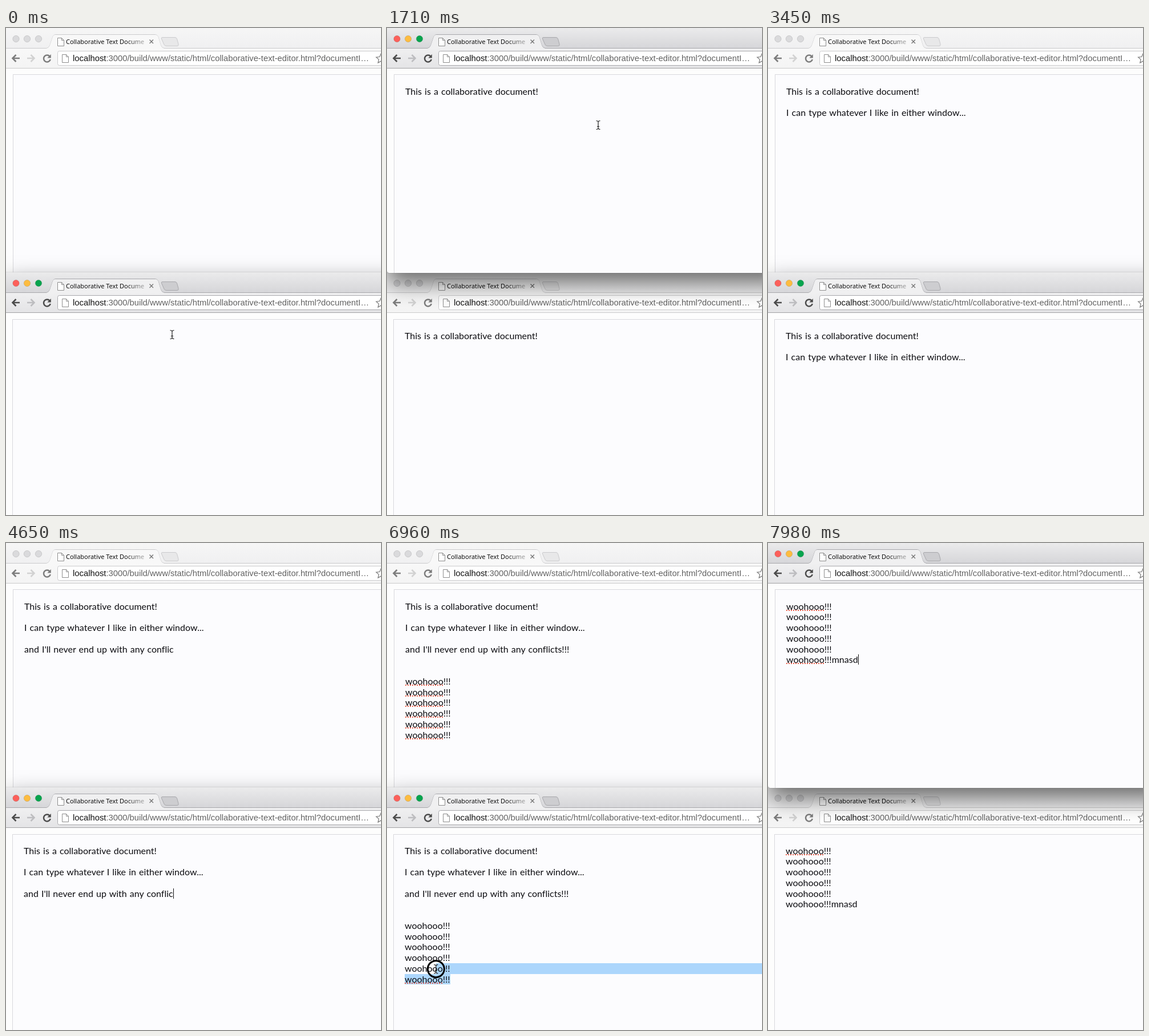
Animation of 657x853 px, one loop 8 s. Source, as an HTML page:

```html
<!DOCTYPE html>
<html lang="en">
<head>
<meta charset="utf-8">
<title>Collaborative text</title>
<style>
html, body { margin: 0; width: 100%; height: 100%; overflow: hidden; }
#stage { position: relative; width: 657px; height: 853px; overflow: hidden; background: #f4f4f5; }
.window {
  position: absolute; left: 0; width: 700px; height: 429px; z-index: 1;
  background: #fdfdfd; border-radius: 0 0 0 4px;
  --top: #f6f6f6; --low: #f0f0f1; --tab: #f8f8f8; --bar: #f4f4f4; --edge: #cbcbcd;
  --line: #cacacb; --icon: #7d7d7d; --dim: #d2d2d2; --plus: #e8e8e9;
  --red: #dadadc; --amber: #dadadc; --green: #dadadc;
}
.window.active {
  z-index: 2; box-shadow: 0 18px 40px rgba(0, 0, 0, .58), 0 0 1px rgba(0, 0, 0, .6);
  --top: #ebebec; --low: #d6d6d9; --tab: #f0f0f1; --bar: #e4e4e6; --edge: #a8a8ac;
  --line: #a2a2a4; --icon: #4c4c4c; --dim: #bdbdc0; --plus: #cdcdd0;
  --red: #fc605b; --amber: #fdbc40; --green: #07a44e;
}
.strip { position: absolute; inset: 0 0 auto; height: 35px; background: linear-gradient(var(--top), var(--low)); }
.bar { position: absolute; inset: 35px 0 auto; height: 35px; background: linear-gradient(var(--tab), var(--bar)); border-bottom: 1px solid var(--line); }
.window svg { position: absolute; left: 0; top: 0; }
.title {
  position: absolute; left: 105px; top: 15px; width: 140px; overflow: hidden;
  font: 11px/17px "Open Sans", sans-serif; color: #000; white-space: pre;
  -webkit-mask-image: linear-gradient(90deg, #000 105px, rgba(0, 0, 0, .25) 140px);
  mask-image: linear-gradient(90deg, #000 105px, rgba(0, 0, 0, .25) 140px);
}
.url { position: absolute; left: 117px; top: 44px; font: 14.8px/18px "Liberation Sans", Arial, sans-serif; color: #626262; white-space: pre; }
.url b { font-weight: normal; color: #111; }
.editor { position: absolute; left: 12px; top: 81px; right: 0; bottom: 0; border: 1px solid #d9d9dd; border-width: 1px 0 0 1px; background: #fcfcfe; }
.doc {
  position: absolute; left: 32px; top: 101.6px; right: 0;
  font: 16px/18.75px Lato, sans-serif; font-variant-ligatures: none;
  word-spacing: 1px; color: #0c0c10; white-space: pre;
}
.doc div { position: relative; height: 18.75px; }
.doc .fit { display: inline-block; height: 18.75px; }
.bad { background: repeating-linear-gradient(90deg, #e8604c 0 2px, transparent 2px 4px) 0 calc(100% - 1px) / 100% 2px no-repeat; }
.caret { display: inline-block; width: 1px; height: 18px; margin-right: -1px; vertical-align: top; background: #111; }
#pointer { position: absolute; left: -20px; top: -20px; z-index: 5; }
</style>
</head>
<body>
<div id="stage">
  <svg id="pointer" width="40" height="40" viewBox="-20 -20 40 40" fill="none">
    <circle id="press" r="14.5" stroke="#000" stroke-width="3"/>
    <path d="M-3.5-7.5Q0-7.5 0-5Q0-7.5 3.5-7.5M0-5V5M-3.5 7.5Q0 7.5 0 5Q0 7.5 3.5 7.5M-2 2.5H2" stroke="#222" stroke-width="1.2"/>
  </svg>
</div>
<script>
const LOOP = 8000, ROW = 18.75, CHEER = 'woohooo!!!';
const SHIFT = 428, DOC_TOP = 101.6, DOC_LEFT = 32;
const DRAG = [6820, 7200], REPLACED = 7330;
const PASTES = [0, 6060, 6190, 6330, 6550, 6640];

// Time spans [from, to)
const TOP_ACTIVE = [[1560, 3300], [4990, 6780], [7560, LOOP]];
const TYPING = [[90, 1330], [1770, 3130], [3510, 4850], [5130, 5620], [5920, 6640], [7640, LOOP]];
const PRESSES = [[1530, 1620], [3280, 3360], [4970, 5050], [6820, 7230], [7540, 7620]];

// Visible pointer moves, as [time, x, y]
const MOVES = [
  [[0, 291, 537], [90, 291, 537]],
  [[1350, 291, 537], [1530, 370, 170], [1770, 370, 170]],
  [[3140, 370, 170], [3280, 330, 560], [3420, 330, 560]],
  [[4850, 330, 560], [4970, 336, 243], [5130, 336, 243]],
  [[5640, 336, 243], [5920, 336, 243]],
  [[6640, 336, 243], [6800, 113, 766], [6820, 113, 766], [6960, 86, 747],
   [7200, 31, 539], [7350, 31, 539], [7540, 205, 205], [7640, 205, 205]]
];

const within = (spans, t) => spans.some(([a, b]) => t >= a && t < b);
const typed = (text, from, to, t) =>
  text.slice(0, Math.max(0, Math.floor((t - from) / (to - from) * text.length)));

const page = (x, y) =>
  `<path d="M${x} ${y}h7l4 4v10h-11zM${x + 7} ${y}v4h4" fill="#fff" stroke="#8d8d8d"/>`;
const light = (x, color) =>
  `<circle cx="${x}" cy="19" r="5.7" fill="var(--${color})" stroke="#000" stroke-opacity=".12"/>`;
const arrow = (x, dir, color) =>
  `<path transform="translate(${x} 53) scale(${dir} 1)" d="M7 0H-5.5M.5-6L-5.5 0L.5 6" fill="none" stroke="var(--${color})" stroke-width="2.6"/>`;

function makeWindow(top, nudge) {
  const el = document.createElement('div');
  el.className = 'window';
  el.style.top = top + 'px';
  if (top) el.style.height = '440px';
  el.innerHTML = `
    <div class="strip"></div><div class="bar"></div>
    <svg width="700" height="72">
      ${light(17.5, 'red')}${light(37, 'amber')}${light(57, 'green')}
      <path d="M0 35.5H71Q75 35 77 30L82 15Q83.5 11.5 87 11.5H261Q265 11.5 266.5 15L271 30Q273 35 277 35.5H700" fill="none" stroke="var(--edge)"/>
      <path d="M71 36Q75 35 77 30L82 15Q83.5 12 87 12H261Q265 12 266.5 15L271 30Q273 35 277 36z" fill="var(--tab)"/>
      <path d="M274 16.5H296Q298.5 16.5 299.5 19L302 28Q303 31.5 300 31.5H281Q278 31.5 277 29L272.5 19Q271.5 16.5 274 16.5z" fill="var(--plus)" stroke="var(--edge)"/>
      <path d="M251.5 20.5l6.5 6.5m0-6.5l-6.5 6.5" stroke="#777" stroke-width="1.4"/>
      ${page(90.5, 17.5)}
      ${arrow(17, 1, 'icon')}${arrow(44, -1, 'dim')}
      <path d="M76.5 49.5A6 6 0 1 0 77.8 55" fill="none" stroke="var(--icon)" stroke-width="2.5"/>
      <path d="M78.8 46v6.5h-6.5z" fill="var(--icon)"/>
      <rect x="90.5" y="40.5" width="640" height="25" rx="3" fill="#fff" stroke="var(--edge)"/>
      ${page(98.5, 46.5)}
      <path d="M657 45l2.400 5.500 6 .6-4.500 4 1.300 6-5.200-3.100-5.200 3.100 1.300-6-4.500-4 6-.6z" fill="none" stroke="#777" stroke-width="1.2"/>
    </svg>
    <div class="title">Collaborative Text Docume</div>
    <div class="url"><b>localhost</b>:3000/build/www/static/html/collaborative-text-editor.html?documentI…</div>
    <div class="editor"></div><div class="doc"></div>`;
  const doc = el.querySelector('.doc');
  if (nudge) {
    doc.style.left = DOC_LEFT - nudge + 'px';
    const editor = el.querySelector('.editor');
    editor.style.left = 12 - nudge + 'px';
    editor.style.top = 81 + nudge + 'px';
  }
  document.getElementById('stage').append(el);
  return { el, doc, html: null };
}

function textRows(t) {
  const rows = Array(13).fill('');
  if (t >= REPLACED) {
    rows.fill(CHEER, 0, 6);
    rows[5] += typed('mnasd', 7680, 7930, t);
    return rows;
  }
  rows[0] = typed('This is a collaborative document!', 90, 1250, t);
  rows[2] = typed('I can type whatever I like in either window...', 1780, 3070, t);
  rows[4] = typed("and I'll never end up with any conflicts!!!", 3550, 4780, t);
  rows[7] = typed(CHEER, 5180, 5520, t);
  PASTES.forEach((at, i) => { if (i && t >= at) rows[7 + i] = CHEER; });
  return rows;
}

function misspelled(row, isTop, t) {
  if (t >= REPLACED) return row === 0 || (isTop && row === 5 && t >= 7560);
  return isTop ? t >= 5520 : row === 12 && t >= 6780;
}

function pointerAt(t) {
  const path = MOVES.find(p => t >= p[0][0] && t < p[p.length - 1][0]);
  if (!path) return null;
  const i = path.findIndex(p => p[0] > t);
  const [a, b] = [path[i - 1], path[i]];
  const k = (t - a[0]) / (b[0] - a[0]);
  return { x: a[1] + (b[1] - a[1]) * k, y: a[2] + (b[2] - a[2]) * k };
}

function selectionAt(t) {
  if (t < DRAG[0] || t >= REPLACED) return null;
  const p = pointerAt(Math.min(t, DRAG[1]));
  const row = Math.floor((p.y - SHIFT - DOC_TOP) / ROW);
  return { row: Math.max(0, Math.min(12, row)), x: Math.max(0, p.x - DOC_LEFT + 1) };
}

function docHtml(rows, isTop, caret, selection, t) {
  const last = Math.max(0, rows.findLastIndex(Boolean));
  return rows.map((text, row) => {
    let body = text;
    if (text.startsWith(CHEER) && misspelled(row, isTop, t))
      body = `<span class="bad">woohooo</span>${text.slice(7)}`;
    let fill = '';
    if (selection && row >= selection.row) {
      const x = row === selection.row ? selection.x.toFixed(1) : 0;
      fill = ` style="background:linear-gradient(90deg,transparent ${x}px,#acd6fc ${x}px)"`;
    }
    const mark = caret && row === last ? '<i class="caret"></i>' : '';
    return row === 12
      ? `<div><span class="fit"${fill}>${body}</span>${mark}</div>`
      : `<div${fill}>${body}${mark}</div>`;
  }).join('');
}

const windows = [makeWindow(0, 0), makeWindow(SHIFT, 1)];
const pointer = document.getElementById('pointer');
const press = document.getElementById('press');

function draw(t) {
  const active = within(TOP_ACTIVE, t) ? 0 : 1;
  const rows = textRows(t);
  windows.forEach((win, i) => {
    win.el.classList.toggle('active', i === active);
    const caret = i === active && within(TYPING, t);
    const html = docHtml(rows, i === 0, caret, i ? selectionAt(t) : null, t);
    if (html !== win.html) win.doc.innerHTML = win.html = html;
  });
  const p = pointerAt(t);
  pointer.style.display = p ? '' : 'none';
  if (p) pointer.style.transform = `translate(${p.x}px, ${p.y}px)`;
  press.style.display = within(PRESSES, t) ? '' : 'none';
}

const start = performance.now();
function tick() {
  draw((performance.now() - start) % LOOP);
  requestAnimationFrame(tick);
}
tick();
</script>
</body>
</html>
```
